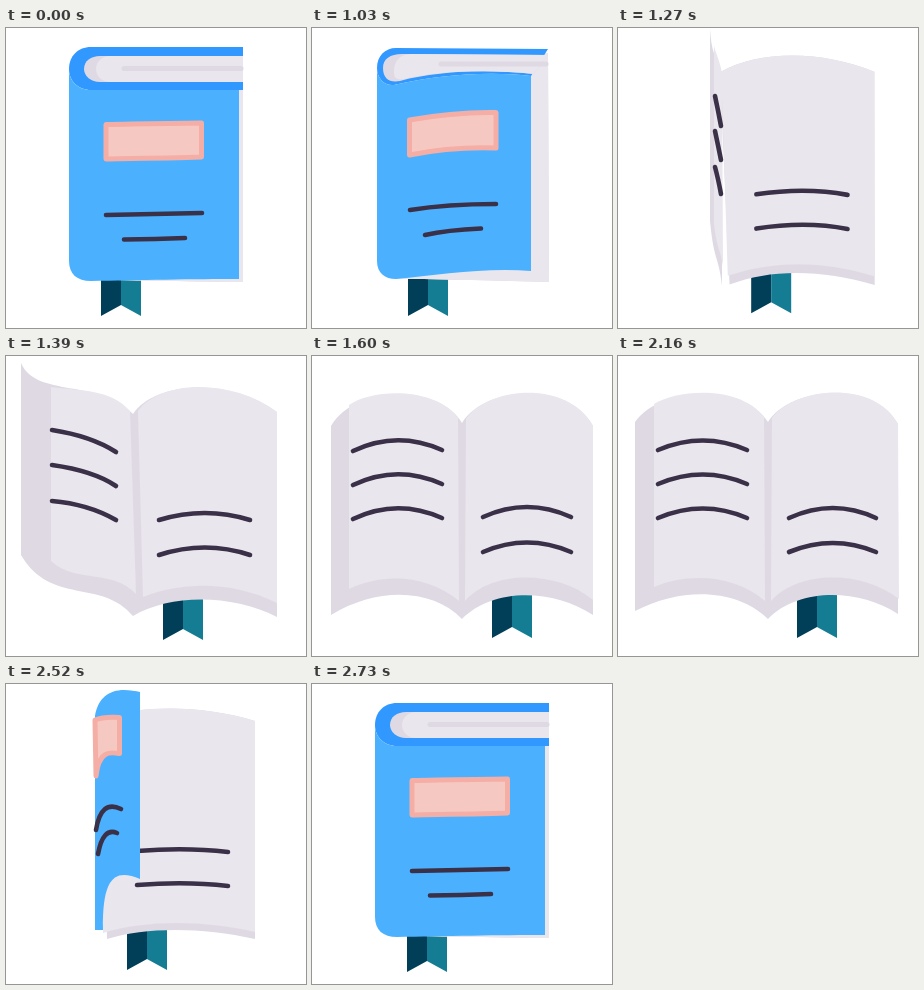
These frames come from a looping animation (300x300 px, 2.76 s). An HTML page:

```html
<!DOCTYPE html>
<html lang="en">
<head>
<meta charset="utf-8">
<title>Opening book</title>
<style>
html, body { margin: 0; width: 100%; height: 100%; overflow: hidden; background: #fff; }
svg { display: block; width: 100vw; height: 100vh; }
</style>
</head>
<body>
<svg id="stage" viewBox="0 0 300 300"></svg>
<script>
const SVG = 'http://www.w3.org/2000/svg';
const stage = document.getElementById('stage');
const LOOP = 2760, FRAME = 30, STEPS = 20, OPEN_AT = 1030, CLOSE_AT = 2160;
const BLUE = '#4bb1ff', BAND = '#3098ff', PAGE = '#eae6ed', SHADE = '#dfd9e4', INK = '#3a3149';
const FLIP = 0.43; // openness at which the cover is seen edge-on
const parts = [];

function add(keys, attrs, from = 0, to = 1, attr = 'd', parent = stage) {
  const node = document.createElementNS(SVG, attr === 'd' ? 'path' : 'g');
  for (const name in attrs) node.setAttribute(name, attrs[name]);
  parent.append(node);
  const times = Object.keys(keys).map(Number).sort((a, b) => a - b);
  const shapes = times.map(t => keys[t]);
  const values = shapes.map(s => s.match(/-?[\d.]+/g).map(Number));
  parts.push({ node, attr, from, to, times, values, shape: shapes[0] });
  return node;
}
const fill = (color, keys, from, to) => add(keys, { fill: color }, from, to);
const line = (keys, from, to, color = INK, width = 4.6) => add(keys,
  { fill: 'none', stroke: color, 'stroke-width': width, 'stroke-linecap': 'round' }, from, to);

// Smooth curve through the key poses, number by number
function pose({ times, values, shape }, u) {
  const last = times.length - 1;
  let i = 0;
  while (i < last - 1 && u > times[i + 1]) i++;
  const gap = k => times[k + 1] - times[k];
  const h = gap(i), t = Math.min(1, Math.max(0, (u - times[i]) / h));
  let n = 0;
  return shape.replace(/-?[\d.]+/g, () => {
    const c = n++;
    const slope = k => (values[k + 1][c] - values[k][c]) / gap(k);
    const tangent = k => k === 0 ? slope(0) : k === last ? slope(last - 1)
      : (slope(k - 1) * gap(k) + slope(k) * gap(k - 1)) / (gap(k) + gap(k - 1));
    const a = values[i][c], b = values[i + 1][c], m = tangent(i) * h, w = tangent(i + 1) * h;
    const v = a + t * (m + t * (3 * (b - a) - 2 * m - w + t * (2 * (a - b) + m + w)));
    return v.toFixed(2);
  });
}

// Bookmark
const ribbon = add({
  0: 'translate(95 288)', 0.05: 'translate(96 288)', 0.25: 'translate(110 287)',
  0.35: 'translate(121 286)', 0.65: 'translate(157 284)', 0.95: 'translate(179 282)', 1: 'translate(180 282)'
}, {}, 0, 1, 'transform');
for (const [d, color] of [['M0 -53H20V-11L0 0Z', '#003f57'], ['M20 -53H40V0L20 -11Z', '#157d93']]) {
  const half = document.createElementNS(SVG, 'path');
  half.setAttribute('d', d);
  half.setAttribute('fill', color);
  ribbon.append(half);
}

// Right page: edge colour, then sheet
fill(SHADE, {
  0: 'M85 28C130 28 190 28 237 28L237 254C190 254 130 252 85 252Z',
  0.05: 'M85 25C130 25 190 25 236 25L237 254C190 253 130 251 85 251Z',
  0.25: 'M100 21C140 18 200 20 243 30L242 254C190 245 120 247 87 254Z',
  0.35: 'M96 34C140 20 200 22 249 37L249 255C195 243 140 243 101 255Z',
  0.65: 'M127 58C150 24 225 22 271 56L271 261C225 238 165 238 127 260Z',
  0.95: 'M150 66C170 32 255 22 280 68L280 258C240 232 180 232 150 263Z',
  1: 'M150 67C172 31 255 23 281 70L281 259C240 232 180 232 150 263Z'
});
fill(PAGE, {
  0: 'M85 28C130 28 190 28 237 28L237 254C190 254 130 252 85 252Z',
  0.05: 'M85 25C130 25 190 25 236 25L237 254C190 253 130 251 85 251Z',
  0.25: 'M100 21C140 18 200 20 243 30L243 247C190 240 120 240 88 246Z',
  0.35: 'M96 34C140 20 200 22 249 37L249 248C195 236 140 236 97 249Z',
  0.65: 'M132 55C155 24 225 22 271 56L271 247C228 225 175 225 137 241Z',
  0.95: 'M154 62C175 32 255 22 280 68L281 243C245 214 180 214 153 245Z',
  1: 'M154 63C176 31 255 23 281 70L281 244C245 214 180 214 153 245Z'
});
line({
  0: 'M115 167Q160 167 206 168', 0.25: 'M124 167Q170 166 215 168.5', 0.35: 'M131 167Q180 163 222 168',
  0.65: 'M153 164Q199 150 244 164', 0.95: 'M171 162Q215 142 258 162', 1: 'M171 161Q215 141 259 161'
}, 0.08);
line({
  0: 'M115 201Q160 201 206 202', 0.25: 'M124 201Q170 200 215 203', 0.35: 'M131 201Q180 197 222 202',
  0.65: 'M153 199Q199 184 244 199', 0.95: 'M171 196Q215 178 258 196', 1: 'M171 196Q215 177 259 196'
}, 0.08);

// Spine and page thickness of the closed book
const tucked = 'M82 60C84 50 95 40 105 40L242 30L163 48C150 50 130 50 110 60C90 60 82 60 82 60Z';
const TOP = 0.19;
fill(BAND, {
  0: 'M63 41C63 28 72 19 85 19L237 19L237 62C190 62 130 62 85 62C72 62 63 53 63 41Z',
  0.05: 'M65 40C65 28 73 20 84 20L236 21L219 48C175 43 125 47 82 57C72 58 65 50 65 40Z',
  0.25: tucked
}, 0, TOP);
fill(SHADE, {
  0: 'M78 41C78 33 85 28 94 28L237 28L237 54C190 54 130 54 94 54C85 54 78 48 78 41Z',
  0.05: 'M71 40C71 31 78 26 90 26L236 27L222 46C175 41 125 43 88 53C78 55 71 51 71 40Z',
  0.25: tucked
}, 0, TOP);
fill(PAGE, {
  0: 'M90 41C90 34 96 28 104 28L237 28L237 54C190 54 130 54 104 54C96 54 90 48 90 41Z',
  0.05: 'M82 44C82 32 88 27 98 26L236 27L222 46C175 41 125 43 92 51C84 52 82 50 82 44Z',
  0.25: tucked
}, 0, TOP);
line({ 0: 'M118 40.5L235 40.5', 0.05: 'M129 36L234 36', 0.25: 'M129 34L240 34' }, 0, 0.12, SHADE, 5);

// Front cover
fill(BLUE, {
  0: 'M63 41C63 53 72 62 85 62C130 62 190 62 233 62L233 251C190 251 130 252 85 253C71 253 63 246 63 233Z',
  0.05: 'M65 40C65 50 72 58 82 57C125 47 175 43 219 48L219 243C175 239 125 247 84 251C73 251 65 245 65 233Z',
  0.25: 'M78 45C82 22 106 6 128 7C142 7 154 13 163 22L163 210C140 192 90 196 87 241C87 252 78 250 78 240Z',
  0.35: 'M89 32C92 14 103 6 118 6C124 6 130 7 134 8L134 195C112 186 96 188 97 246C95 246 91 246 89 246Z',
  0.45: 'M99 32C99 12 100 4 102 3C103 2 105 2 106 2L106 193C104 190 102 190 102 246C101 246 100 246 99 246Z'
}, 0, FLIP);
add({
  0: 'M100 96.5C130 95.5 165 95.5 195.5 95L195.5 129C165 130 130 130.5 100 131Z',
  0.05: 'M97.5 92C125 87 155 84 184 84.5L184 120C155 119 125 121.5 97.5 127Z',
  0.25: 'M94 70C96 52 118 40 140 51L140 86C122 76 104 83 94 107Z',
  0.35: 'M89 36C96 33 105 33 113.5 33.5L113.5 69.5C104 68 93 66 90 92Z',
  0.45: 'M100 34C101 32 103 32 104 33L104 69C103 67 102 66 101 88Z'
}, { fill: '#f6c8c2', stroke: '#f5aea6', 'stroke-width': 5, 'stroke-linejoin': 'round' }, 0, FLIP);
line({
  0: 'M100 187Q150 186 196 185', 0.05: 'M98 182Q135 176 184 176', 0.25: 'M93 163Q108 134 136 145.5',
  0.35: 'M90 146Q95 115 115 125', 0.45: 'M100 146Q101 115 104 125'
}, 0, FLIP);
line({
  0: 'M118 211.5Q150 211 179 210', 0.05: 'M113 207Q135 202 169 200.5', 0.25: 'M98 186Q107 163 131 170',
  0.35: 'M92 170Q97 143 111 149', 0.45: 'M101 170Q102 143 104 149'
}, 0, FLIP);

// Left page: edge colour, then sheet and text lines
fill(SHADE, {
  0.45: 'M92 1C94 30 99 28 104 46L104 258C100 225 96 235 92 193Z',
  0.65: 'M15 7C30 42 92 22 127 58L127 260C95 222 45 250 15 199Z',
  0.8: 'M4.5 28C30 34 108 23 141 62L141 262C108 226 52 246 4.5 223Z',
  0.95: 'M17 66C45 28 125 28 150 66L150 263C120 233 65 230 17 255Z',
  1: 'M19 70C45 27 128 29 150 67L150 263C120 232 65 231 19 259Z'
}, FLIP);
fill(PAGE, {
  0.45: 'M96 18C98 26 101 30 104 45L105 238C102 220 99 222 96 196Z',
  0.65: 'M45 31C75 35 105 33 124 55L130 238C105 212 70 228 45 205Z',
  0.8: 'M32 34C60 33 115 28 137 57L139 242C108 214 70 228 32 219Z',
  0.95: 'M36 48C60 33 122 29 146 61L147 245C115 218 70 217 36 231Z',
  1: 'M37 49C60 33 122 30 146 62L147 245C115 218 70 217 37 233Z'
}, FLIP);
const rows = [
  ['M97 68Q100 82 103 98', 'M46 74Q85 80 110 96', 'M36 82Q84 74 121 94', 'M40 94Q85 75 129 94', 'M41 95Q85 74 130 94'],
  ['M97 103Q100 117 103 132', 'M46 109Q88 115 110 130', 'M36 117Q84 109 121 128', 'M40 128Q85 109 129 128', 'M41 129Q85 108 130 128'],
  ['M97 139Q100 150 103 166', 'M46 145Q82 148 110 164', 'M36 152Q84 143 121 162', 'M40 162Q85 143 129 162', 'M41 163Q85 142 130 162']
];
for (const [a, b, c, d, e] of rows) line({ 0.45: a, 0.65: b, 0.8: c, 0.95: d, 1: e }, FLIP);

function progress(ms, start) {
  const step = Math.floor((ms - start) / FRAME) + 1;
  return Math.min(1, Math.max(0, step / STEPS));
}

function draw() {
  const ms = performance.now() % LOOP;
  const open = progress(ms, OPEN_AT) - progress(ms, CLOSE_AT);
  for (const part of parts) {
    const shown = open >= part.from && open <= part.to;
    part.node.style.display = shown ? '' : 'none';
    if (shown) part.node.setAttribute(part.attr, pose(part, open));
  }
  requestAnimationFrame(draw);
}
draw();
</script>
</body>
</html>
```
